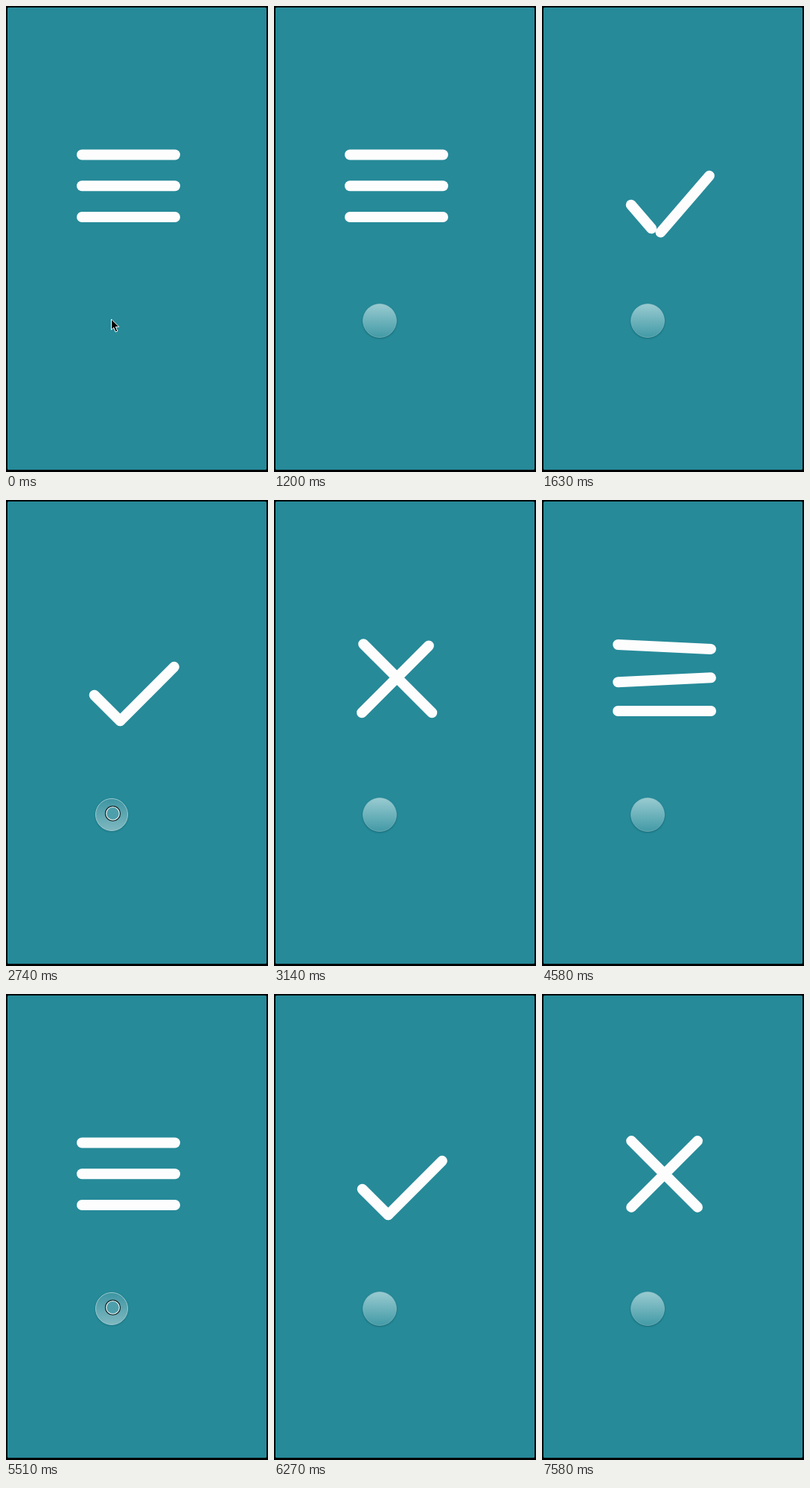
Recreate the animation shown at these times as an HTML page. Size 352 by 625 pixels, loop 8000 ms.

```html
<!DOCTYPE html>
<html lang="en">
<head>
<meta charset="utf-8">
<title>Menu icon morph</title>
<style>
  html, body { margin: 0; width: 100%; height: 100%; overflow: hidden; background: #000; }
  svg { display: block; width: 100%; height: 100%; }
</style>
</head>
<body>
<svg viewBox="0 0 352 625" preserveAspectRatio="none">
  <defs>
    <linearGradient id="raised" x1="0" y1="0" x2="0" y2="1">
      <stop offset="0" stop-color="#9acbd1"/>
      <stop offset="1" stop-color="#429aa6"/>
    </linearGradient>
    <linearGradient id="sunken" x1="0" y1="0" x2="0" y2="1">
      <stop offset="0" stop-color="#3d95a2"/>
      <stop offset="1" stop-color="#7fb8c0"/>
    </linearGradient>
    <filter id="blur" x="-20%" y="-20%" width="140%" height="140%">
      <feGaussianBlur stdDeviation="0.8"/>
    </filter>
  </defs>
  <rect width="352" height="625" fill="#000"/>
  <rect x="2" y="2" width="348" height="620" rx="1.5" fill="#268a99"/>
  <g id="bars" stroke="#fdfdfd" stroke-width="14" stroke-linecap="round">
    <line/><line/><line/>
  </g>
  <path id="arrow" d="M141.5 420v14.2l3.2-3 2.5 5.9 2.6-1.1-2.5-5.7h4.5z"
        fill="#000" stroke="#fff" stroke-width="1" stroke-linejoin="round"/>
  <g id="up">
    <circle cx="142" cy="423" r="23" fill="#0d5560" opacity=".6" filter="url(#blur)"/>
    <circle cx="142" cy="422" r="22.5" fill="url(#raised)" stroke="#8bc1c8" stroke-opacity=".6" stroke-width="1"/>
  </g>
  <g id="down">
    <circle cx="142" cy="422.8" r="22.3" fill="#0d5560" opacity=".4" filter="url(#blur)"/>
    <circle cx="142" cy="422" r="21.5" fill="url(#sunken)" stroke="#9ccbd1" stroke-width="1"/>
    <circle cx="143.5" cy="420.5" r="9.8" fill="#4d9fab" stroke="#16272a" stroke-width="1.6"/>
    <circle cx="143.5" cy="420.5" r="8.8" fill="none" stroke="#f4fafa" stroke-width="1.1"/>
  </g>
</svg>
<script>
  const LOOP = 8000, STEP = 57, SETTLE = 570;

  // Each bar: centre x, centre y, length, angle in degrees, opacity
  const MENU = [[164.5, 199.5, 125, 0, 1], [164.5, 241.3, 125, 0, 1], [164.5, 283, 125, 0, 1]];
  const CHECK = [[189.75, 260, 102.2, -45, 1], [136, 279, 49, 45, 1], [164.5, 283, 125, 0, 0]];
  const CROSS = [[164.5, 241.5, 125.6, -45, 1], [164.5, 241.5, 125.6, 45, 1], [164.5, 283, 125, 0, 0]];

  const TAPS = [
    { press: 1290, release: 1460, from: MENU, to: CHECK },
    { press: 2740, release: 2910, from: CHECK, to: CROSS },
    { press: 4170, release: 4350, from: CROSS, to: MENU },
    { press: 5510, release: 5690, from: MENU, to: CHECK },
    { press: 6840, release: 7010, from: CHECK, to: CROSS }
  ];
  const APPEAR = 1200;

  const byId = id => document.getElementById(id);
  const lines = byId("bars").children;
  const show = (id, on) => byId(id).setAttribute("display", on ? "inline" : "none");

  // Underdamped spring from 0 to 1
  function spring(ms) {
    const damping = 0.6, freq = 22, s = ms / 1000;
    const root = Math.sqrt(1 - damping * damping), w = freq * root * s;
    return 1 - Math.exp(-damping * freq * s) * (Math.cos(w) + damping / root * Math.sin(w));
  }

  function progress(ms) {
    return ms >= SETTLE ? 1 : spring(Math.floor(ms / STEP) * STEP);
  }

  function drawBar(line, a, b, p) {
    const [x, y, len, angle, alpha] = a.map((v, i) => v + (b[i] - v) * p);
    const rad = angle * Math.PI / 180;
    const dx = Math.cos(rad) * len / 2, dy = Math.sin(rad) * len / 2;
    const ends = { x1: x - dx, y1: y - dy, x2: x + dx, y2: y + dy };
    for (const key in ends) line.setAttribute(key, ends[key].toFixed(2));
    line.setAttribute("opacity", Math.min(1, Math.max(0, alpha)));
  }

  function render(t) {
    const tap = TAPS.filter(item => t >= item.release).pop();
    const from = tap ? tap.from : MENU, to = tap ? tap.to : MENU;
    const p = tap ? progress(t - tap.release) : 1;
    from.forEach((bar, i) => drawBar(lines[i], bar, to[i], p));

    const pressed = TAPS.some(item => t >= item.press && t < item.release);
    show("arrow", t < APPEAR);
    show("up", t >= APPEAR && !pressed);
    show("down", pressed);
  }

  const start = performance.now();
  function tick() {
    render((performance.now() - start) % LOOP);
    requestAnimationFrame(tick);
  }
  tick();
</script>
</body>
</html>
```
